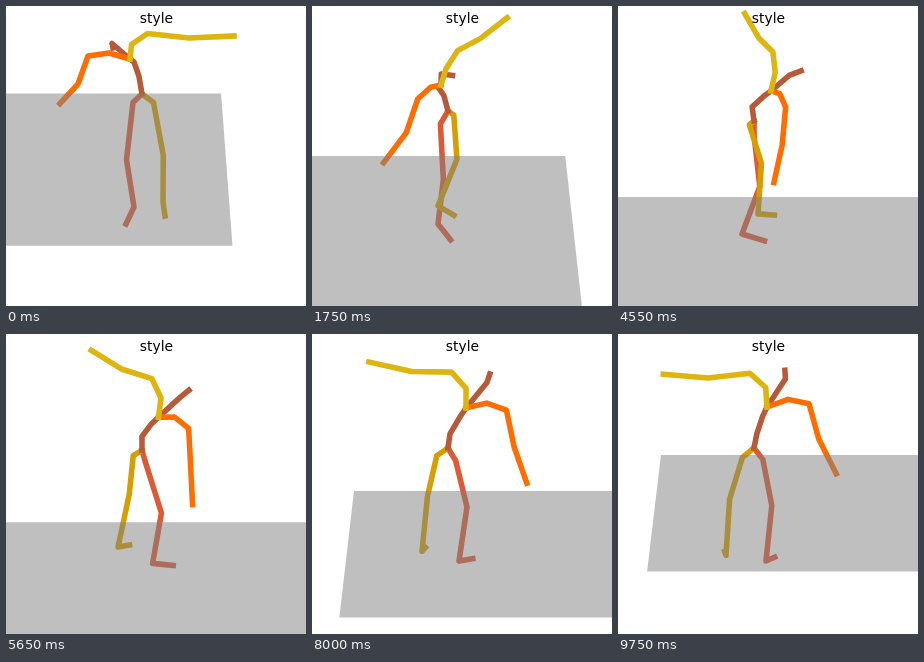
Animation of 300x300 px, one loop 9800 ms. Source, as an HTML page with a canvas:

```html
<!DOCTYPE html>
<html>
<head>
<meta charset="utf-8">
<style>
html, body { margin: 0; width: 100%; height: 100%; overflow: hidden; background: #fff; }
canvas { display: block; }
</style>
</head>
<body>
<canvas id="stage" width="300" height="300"></canvas>
<script>
const ctx = document.getElementById('stage').getContext('2d');
const LOOP = 9800, STEP = 50;
const ROOT_X = 136, TILT = 0.5;
const VANISH = { x: 150, y: -780 }, FLOOR_WIDTH = 0.45;

// The dancer turns half a circle while the body drifts and steps:
// [time, yaw, root y, chest x, chest y, right ankle dx, left ankle dx, floor top, floor left slope]
const poses = [
  [0,      0,  88, 124, 53,  -8,  21, 87.5, -.375],
  [1750,  55, 105, 129, 79, -10, -10, 150,  -.339],
  [2800,  78, 111, 143, 85, -23,  15, 177,  -.29],
  [4550, 109, 115, 153, 85, -12,   4, 191,  -.2],
  [6700, 154, 117, 152, 80,  27, -45, 182,  -.157],
  [8000, 163, 114, 154, 74,  11, -26, 157,  -.1153],
  [9750, 178, 114, 149, 73,  12, -28, 121,  -.1188]
];

// Rigid offsets in the dancer's own frame: [left, up, forward].
const lowBack = [-3, 16, -3], highBack = [4, -6, -6];
const head = [[-18, 22, 13], [-17, 24, 26]];
const rightArm = [[-21, 7, 2], [-42, 3.5, 1], [-52, -28, -6], [-70, -55, -21]];
const leftArm = [[1.5, 17, 5], [17.5, 29.5, 8], [59, 24.5, 7], [104, 27, 8]];
const rightLeg = { hip: [-9, -10, -3], knee: [-7, 0, 10], foot: [-8, -6.5, 21] };
const leftLeg = { hip: [11.5, -9, -1], knee: [5, 2, 10], foot: [2, -5, 18] };

// Monotone cubic interpolation of all values of a key list.
function sample(keys, t) {
  const last = keys.length - 2;
  let i = 0;
  while (i < last && t >= keys[i + 1][0]) i++;
  const slope = (k, c) => (keys[k + 1][c] - keys[k][c]) / (keys[k + 1][0] - keys[k][0]);
  const tangent = (k, c) => {
    if (k === 0) return slope(0, c);
    if (k > last) return slope(last, c);
    const a = slope(k - 1, c), b = slope(k, c);
    return a * b > 0 ? 2 * a * b / (a + b) : 0;
  };
  const span = keys[i + 1][0] - keys[i][0];
  const u = (t - keys[i][0]) / span, v = 1 - u;
  return keys[i].slice(1).map((from, n) => {
    const c = n + 1;
    return from * v * v * (1 + 2 * u) + keys[i + 1][c] * u * u * (3 - 2 * u)
      + span * u * v * (v * tangent(i, c) - u * tangent(i + 1, c));
  });
}

function chain(color, points) {
  ctx.strokeStyle = color;
  ctx.beginPath();
  for (const [x, y] of points) ctx.lineTo(x, y);
  ctx.stroke();
}

function drawFloor(top, left, depth) {
  const bottom = VANISH.y + 1 / (1 / (top - VANISH.y) - depth);
  const right = left + FLOOR_WIDTH;
  const corner = (slope, y) => ctx.lineTo(VANISH.x + slope * (y - VANISH.y), y);
  ctx.fillStyle = 'rgba(128,128,128,.5)';
  ctx.beginPath();
  corner(left, top);
  corner(right, top);
  corner(right, bottom);
  corner(left, bottom);
  ctx.fill();
}

function draw(t) {
  const [yaw, rootY, chestX, chestY, rightStep, leftStep, floorTop, floorLeft] = sample(poses, t);
  const cos = Math.cos(yaw * Math.PI / 180), sin = Math.sin(yaw * Math.PI / 180);
  const root = [ROOT_X, rootY], chest = [chestX, chestY];

  // Turns a body offset by the yaw and views it from above.
  const from = ([x, y], [left, up, forward]) => [
    x + left * cos + forward * sin,
    y - up + TILT * (forward * cos - left * sin)
  ];
  const arm = (color, offsets) => chain(color, [chest, ...offsets.map(o => from(chest, o))]);
  const leg = (color, { hip, knee, foot }, dx, dy) => {
    const top = from(root, hip), ankle = [ROOT_X + dx, rootY + dy];
    const middle = [(top[0] + ankle[0]) / 2, (top[1] + ankle[1]) / 2];
    chain(color, [root, top, from(middle, knee), ankle, from(ankle, foot)]);
  };

  ctx.fillStyle = '#fff';
  ctx.fillRect(0, 0, 300, 300);
  ctx.lineWidth = 5.56;
  ctx.lineCap = 'square';
  ctx.lineJoin = 'round';
  leg('#dd5a37', rightLeg, rightStep, 113);
  leg('#d69e00', leftLeg, leftStep, 108 - 16 * sin);
  chain('#b75a39', [root, from(root, lowBack), from(chest, highBack), chest,
    ...head.map(o => from(chest, o))]);
  arm('#ff6d00', rightArm);
  arm('#ddb50e', leftArm);

  // The near edge is out of view while the depth changes.
  drawFloor(floorTop, floorLeft, t < LOOP / 2 ? 172e-6 : 127e-6);

  ctx.fillStyle = '#000';
  ctx.font = '13.89px "DejaVu Sans", sans-serif';
  ctx.textAlign = 'center';
  ctx.fillText('style', 150.5, 17);
}

function tick() {
  const t = performance.now() % LOOP;
  draw(Math.floor(t / STEP) * STEP);
  requestAnimationFrame(tick);
}
tick();
</script>
</body>
</html>
```
